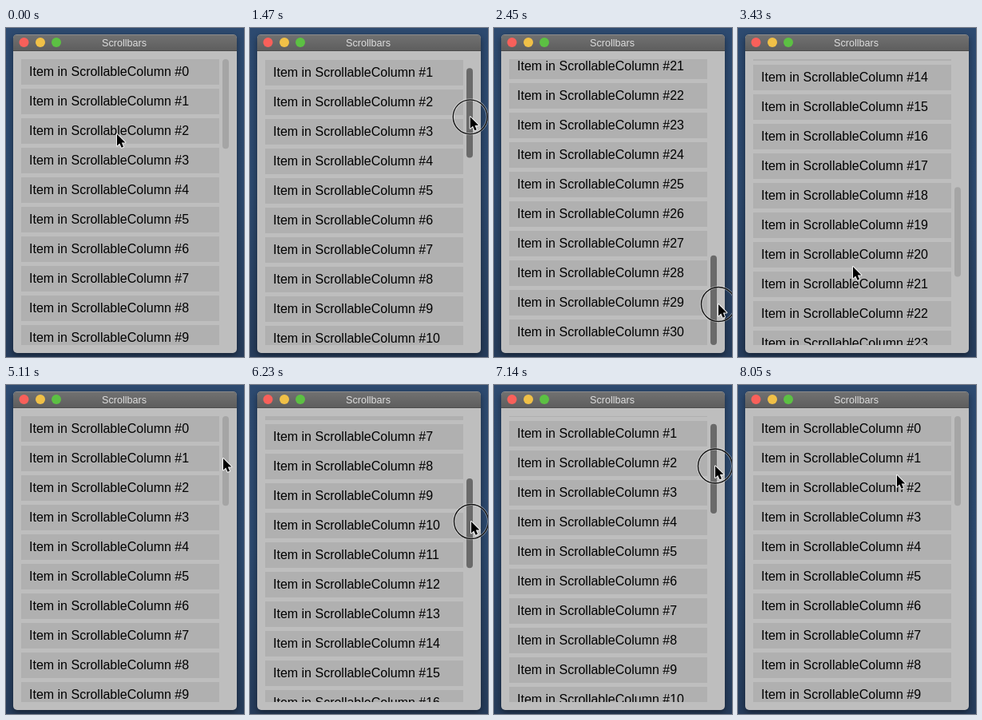
Write an HTML page with a canvas that moves like this. It is 298 px wide and 412 px high and loops after 8.47 s.

```html
<!DOCTYPE html>
<html lang="en">
<head>
<meta charset="utf-8">
<title>Scrollbars</title>
<style>
html, body { margin: 0; width: 100%; height: 100%; overflow: hidden; background: #263f60; }
canvas { display: block; }
</style>
</head>
<body>
<canvas id="stage" width="298" height="412"></canvas>
<script>
const ctx = document.getElementById('stage').getContext('2d');
const LOOP = 8470, STEP = 70;
const ITEMS = 31, PITCH = 37, ITEM_H = 32;
const VIEW = { x: 19, y: 39, w: 248, h: 358 };
const CONTENT = ITEMS * PITCH - 5;
const THUMB_H = VIEW.h * VIEW.h / CONTENT;
const TRAVEL = VIEW.h - THUMB_H;

// [time, thumb offset]
const thumbKeys = [
  [1330, 0], [2030, 156.1], [2450, TRAVEL], [3220, TRAVEL],
  [3290, 238], [3360, 214], [3430, 160.3], [3500, 0],
  [5530, 0], [6230, 78], [6370, 88], [6790, 45], [7350, 0]
];
// [time, x, y]
const cursorKeys = [
  [0, 139, 133], [800, 271, 104], [1050, 275, 100], [1330, 275, 100],
  [2030, 282, 256], [2450, 281, 346], [2590, 278, 344], [3150, 144, 299],
  [3780, 144, 299], [4690, 256, 124], [5110, 272, 92], [5390, 277, 93],
  [5530, 277, 93], [6230, 277, 171], [6370, 277, 181], [6790, 277, 136],
  [7350, 277, 92], [7490, 276, 92], [8050, 199, 113]
];

const clamp = v => Math.max(0, Math.min(1, v));
const within = (t, a, b) => t >= a && t < b;

// Monotone cubic interpolation of column c
function sample(keys, c, t) {
  const last = keys.length - 1;
  if (t <= keys[0][0]) return keys[0][c];
  if (t >= keys[last][0]) return keys[last][c];
  let i = 0;
  while (t >= keys[i + 1][0]) i++;
  const rate = k => (keys[k + 1][c] - keys[k][c]) / (keys[k + 1][0] - keys[k][0]);
  const slope = k => {
    if (k === 0 || k === last) return 0;
    const a = rate(k - 1), b = rate(k);
    return a * b <= 0 ? 0 : 2 * a * b / (a + b);
  };
  const span = keys[i + 1][0] - keys[i][0];
  const u = (t - keys[i][0]) / span, v = 1 - u;
  return keys[i][c] * (1 + 2 * u) * v * v + keys[i + 1][c] * u * u * (3 - 2 * u)
    + span * u * v * (slope(i) * v - slope(i + 1) * u);
}

function hoverAt(t) {
  const ramp = start => clamp((t - start) / 280);
  return ramp(770) - ramp(2660) + ramp(5110) - ramp(7600);
}

function roundRect(x, y, w, h, r) {
  ctx.beginPath();
  ctx.roundRect(x, y, w, h, r);
}

function vertical(y0, y1, ...colors) {
  const g = ctx.createLinearGradient(0, y0, 0, y1);
  colors.forEach((c, i) => g.addColorStop(i / (colors.length - 1), c));
  return g;
}

function disc(x, y, r, color) {
  ctx.fillStyle = color;
  ctx.beginPath();
  ctx.arc(x, y, r, 0, Math.PI * 2);
  ctx.fill();
}

function drawWindow() {
  ctx.fillStyle = vertical(0, 412, '#2d4a70', '#2c496e', '#263c5b');
  ctx.fillRect(0, 0, 298, 412);

  ctx.save();
  ctx.shadowColor = 'rgba(0,0,0,.45)';
  ctx.shadowBlur = 9;
  ctx.shadowOffsetY = 3;
  ctx.fillStyle = '#bebebe';
  roundRect(9, 8, 280, 399, 5);
  ctx.fill();
  ctx.restore();

  ctx.fillStyle = vertical(8, 29, '#727272', '#5d5d5d');
  roundRect(9, 8, 280, 21, [5, 5, 0, 0]);
  ctx.fill();
  ctx.fillStyle = '#8b8b8b';
  ctx.fillRect(13, 8, 272, 1);
  ctx.fillStyle = '#4c4c4c';
  ctx.fillRect(9, 28, 280, 1);

  disc(22.5, 18, 6, '#f9605a');
  disc(43, 18, 6, '#f0c047');
  disc(63, 18, 6, '#5cc043');

  ctx.fillStyle = '#dedede';
  ctx.font = '12.6px "Liberation Sans", Arial, sans-serif';
  ctx.textAlign = 'center';
  ctx.fillText('Scrollbars', 148, 23);
}

function drawList(scroll) {
  ctx.save();
  ctx.beginPath();
  ctx.rect(VIEW.x, VIEW.y, VIEW.w, VIEW.h);
  ctx.clip();
  ctx.font = '16px "Liberation Sans", Arial, sans-serif';
  ctx.textAlign = 'left';
  for (let i = 0; i < ITEMS; i++) {
    const y = VIEW.y + i * PITCH - Math.round(scroll);
    if (y + ITEM_H < VIEW.y || y > VIEW.y + VIEW.h) continue;
    ctx.fillStyle = '#b0b0b0';
    ctx.fillRect(VIEW.x, y, VIEW.w, ITEM_H);
    ctx.fillStyle = '#000';
    ctx.fillText('Item in ScrollableColumn #' + i, 29, y + 21);
  }
  ctx.restore();
}

function drawThumb(offset, hover) {
  ctx.fillStyle = `rgba(0,0,0,${0.13 + 0.31 * hover})`;
  roundRect(271, VIEW.y + offset, 8, THUMB_H, 4);
  ctx.fill();
}

function drawCursor(x, y, pressed) {
  if (pressed) {
    ctx.beginPath();
    ctx.arc(x, y, 21.5, 0, Math.PI * 2);
    ctx.strokeStyle = 'rgba(255,255,255,.45)';
    ctx.lineWidth = 3;
    ctx.stroke();
    ctx.strokeStyle = '#111';
    ctx.lineWidth = 1.4;
    ctx.stroke();
  }
  ctx.save();
  ctx.translate(x, y);
  ctx.beginPath();
  [[0, 0], [0, 14.5], [3.3, 11.5], [5.6, 16.8], [8, 15.8], [5.8, 10.6], [10.4, 10.4]]
    .forEach(p => ctx.lineTo(...p));
  ctx.closePath();
  ctx.lineJoin = 'round';
  ctx.lineWidth = 2;
  ctx.strokeStyle = '#f4f4f4';
  ctx.stroke();
  ctx.fillStyle = '#000';
  ctx.fill();
  ctx.restore();
}

function draw(t) {
  const offset = sample(thumbKeys, 1, t);
  const pressed = within(t, 1400, 2520) || within(t, 5600, 7490);
  drawWindow();
  drawList(offset / TRAVEL * (CONTENT - VIEW.h));
  drawThumb(offset, hoverAt(t));
  drawCursor(sample(cursorKeys, 1, t), sample(cursorKeys, 2, t), pressed);
}

const start = performance.now();
function tick() {
  const t = (performance.now() - start) % LOOP;
  draw(Math.floor(t / STEP) * STEP);
  requestAnimationFrame(tick);
}
tick();
</script>
</body>
</html>
```
